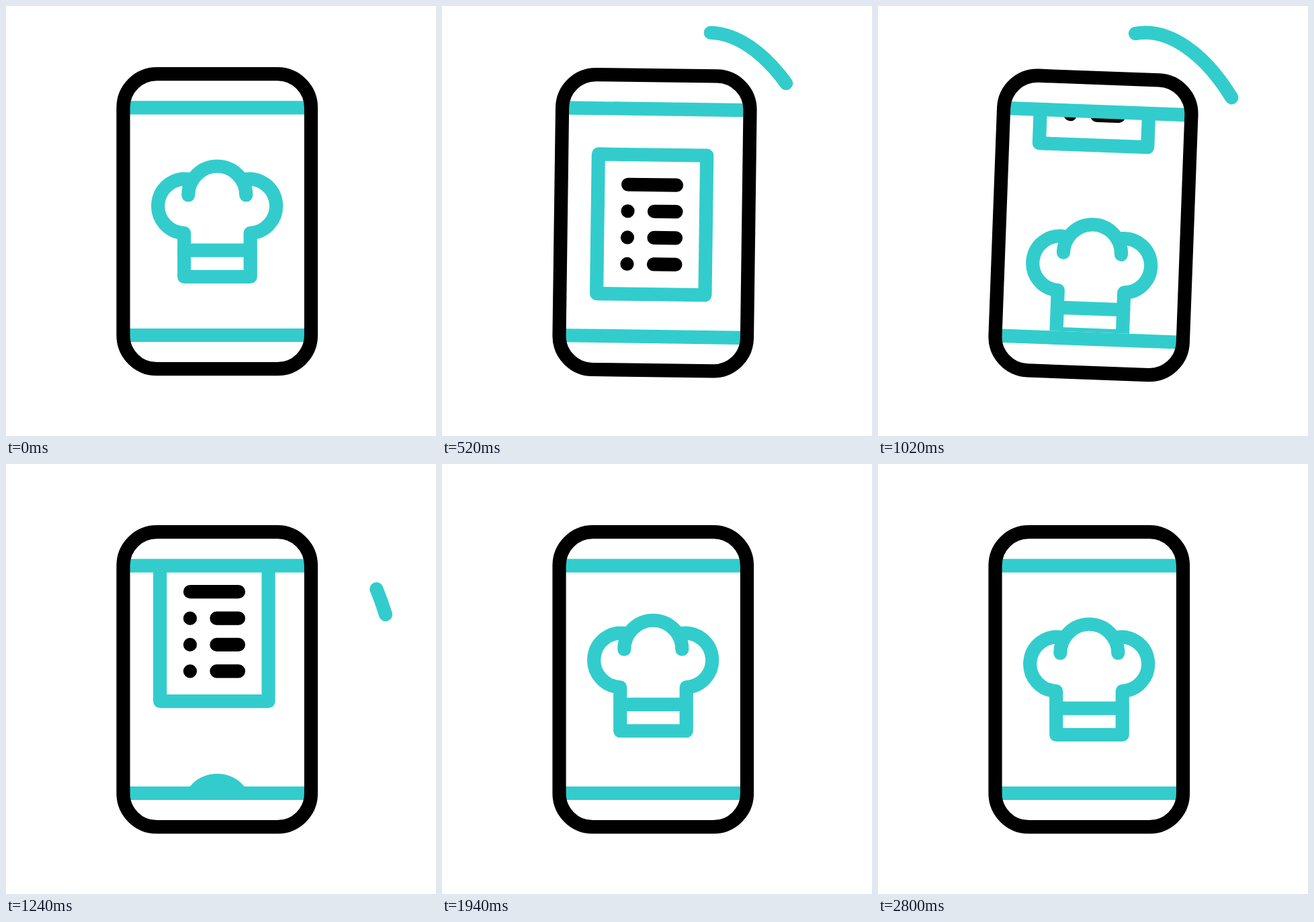
Write an HTML page that moves like this. It is 640 px wide and 640 px high and loops after 2960 ms.

```html
<!DOCTYPE html>
<html lang="en">
<head>
<meta charset="utf-8">
<title>Recipe phone</title>
<style>
  html, body { margin: 0; width: 100%; height: 100%; overflow: hidden; background: #fff; }
  svg { display: block; width: 100vw; height: 100vh; }
  svg * { fill: none; stroke-width: 20.2; stroke-linecap: round; stroke-linejoin: round; }
  .teal { stroke: #33cccc; }
  .black { stroke: #000; }
</style>
</head>
<body>
<svg viewBox="0 0 640 640">
  <defs>
    <clipPath id="screen"><rect x="184" y="155" width="260" height="325"/></clipPath>
    <g id="hat" class="teal">
      <path d="M271.3 281.5A43 43 0 1 1 357.3 281.5"/>
      <path d="M272 257.8A40.3 40.3 0 1 0 265.2 338V403H363.7V338A40.3 40.3 0 1 0 356.5 257.8M265 363.6H364"/>
    </g>
    <g id="menu">
      <rect class="teal" x="229.2" y="218.3" width="161.4" height="207.6"/>
      <path class="black" d="M274 263H346M274 302.5h.01M313.5 302.5H346M274 341.7h.01M313.5 341.7H346M274 381.2h.01M313.5 381.2H346"/>
    </g>
  </defs>
  <g id="phone">
    <g clip-path="url(#screen)">
      <g id="strip">
        <use href="#hat"/>
        <use href="#menu" y="295.5"/>
        <use href="#hat" y="601"/>
        <use href="#menu" y="887.4"/>
        <use href="#hat" y="1193"/>
      </g>
    </g>
    <path class="teal" d="M182 151.3H447M182 490H447" style="stroke-linecap:butt"/>
    <rect class="black" x="174.5" y="101.2" width="279.5" height="439" rx="50"/>
  </g>
  <path id="arc" class="teal" pathLength="1" d="M383 41C455 28 532 115 565 224"/>
</svg>
<script>
const LOOP = 2960;
const [phone, strip, arc] = ['phone', 'strip', 'arc'].map(id => document.getElementById(id));

const scrollKeys = [[200, -1193], [520, -887], [740, -716], [1240, -369], [1580, -124],
  [1830, 20], [2100, -50], [2220, -38], [2340, -20], [2800, 0]];
const tiltKeys = [[200, 0], [386, -2.3], [606, 2.3], [826, -2.3], [1046, 2.3], [1240, 0]];
// Each sweep: start, end, share of the arc it reaches
const sweeps = [[230, 710, 0.71], [710, 1310, 1]];

const smooth = x => {
  x = Math.min(1, Math.max(0, x));
  return x * x * (3 - 2 * x);
};

// Smooth curve through the keys that rests at every turning point
function follow(keys, t) {
  const last = keys.length - 1;
  if (t <= keys[0][0]) return keys[0][1];
  if (t >= keys[last][0]) return keys[last][1];
  const rate = i => (keys[i + 1][1] - keys[i][1]) / (keys[i + 1][0] - keys[i][0]);
  const slope = i => {
    if (i === 0 || i === last) return 0;
    const a = rate(i - 1), b = rate(i);
    return a * b > 0 ? 2 * a * b / (a + b) : 0;
  };
  const i = keys.findIndex(k => k[0] > t) - 1;
  const [t0, v0] = keys[i], [t1, v1] = keys[i + 1];
  const d = t1 - t0, u = (t - t0) / d, w = 1 - u;
  return v0 + (v1 - v0) * smooth(u) + d * u * w * (slope(i) * w - slope(i + 1) * u);
}

function drawArc(t) {
  const sweep = sweeps.find(([start, end]) => t > start && t < end);
  arc.style.display = sweep ? '' : 'none';
  if (!sweep) return;
  const [start, end, reach] = sweep;
  const p = (t - start) / (end - start);
  const head = reach * smooth(p / 0.857);
  const tail = reach * smooth((p - 0.52) / 0.48);
  arc.setAttribute('stroke-dasharray', `${Math.max(0.001, head - tail)} 2`);
  arc.setAttribute('stroke-dashoffset', -tail);
}

function frame() {
  const t = performance.now() % LOOP;
  strip.setAttribute('transform', `translate(0 ${follow(scrollKeys, t)})`);
  phone.setAttribute('transform', `rotate(${follow(tiltKeys, t)} 165 490)`);
  drawArc(t);
  requestAnimationFrame(frame);
}
frame();
</script>
</body>
</html>
```
